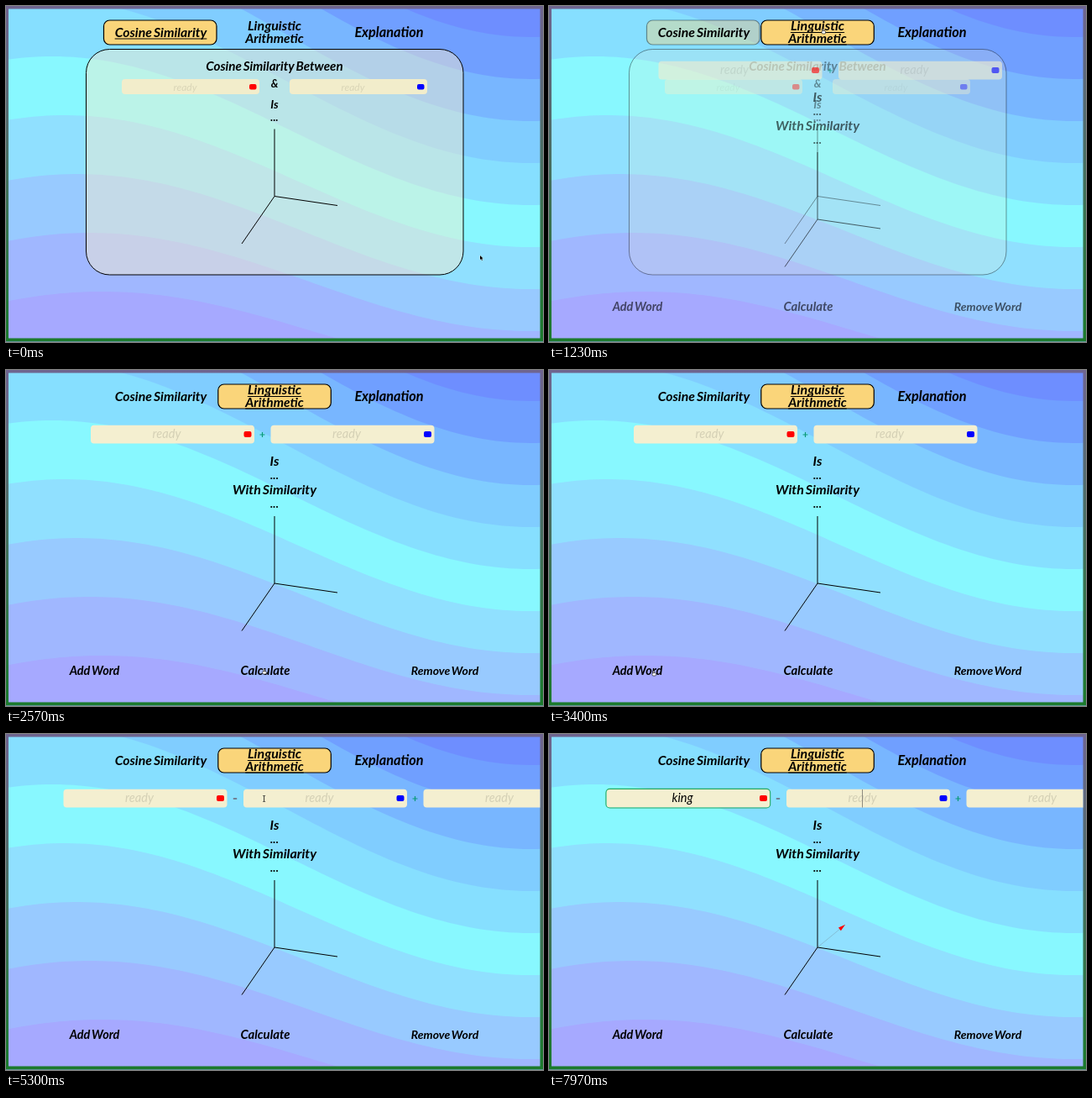
An HTML page with a canvas for the animation above (8 s loop, 640 by 400 pixels).

```html
<!DOCTYPE html>
<html lang="en">
<head>
<meta charset="utf-8">
<title>Word vectors</title>
<style>
  html, body { margin: 0; width: 100%; height: 100%; overflow: hidden; }
  canvas { display: block; width: 640px; height: 400px; }
</style>
</head>
<body>
<canvas id="stage" width="640" height="400"></canvas>
<script>
const ctx = document.getElementById('stage').getContext('2d');
const LOOP = 8000;
const SCRIPT = 'Lato, "Open Sans", sans-serif';
const CREAM = '#f4efd0';
const BANDS = ['#6e8eff', '#709fff', '#78b6ff', '#80cdff', '#86dfff',
               '#88f8ff', '#90e0ff', '#98caff', '#a0b7ff', '#a6a9ff'];

// Keyframes: [time, value, ...]
const CURSOR = [
  [470, 565, 297], [830, 327, 27], [1400, 327, 27], [1850, 267, 72], [2000, 267, 72],
  [2600, 308, 358], [3030, 308, 358], [3330, 125, 358], [3480, 125, 358], [3850, 305, 76],
  [4080, 305, 76], [4230, 351, 77], [4370, 351, 77], [4480, 363, 76], [5230, 363, 76],
  [5400, 215, 76], [5440, 215, 76], [5600, 306, 193]
];
const ROW = [[2050, 130.5], [2450, 101], [4370, 101], [4490, 26.5], [4750, 26.5], [5130, 68.5]];

const progress = (t, from, to) => Math.min(1, Math.max(0, (t - from) / (to - from)));
const smooth = p => p * p * (3 - 2 * p);

function valueAt(keys, t) {
  const next = keys.findIndex(k => k[0] > t);
  if (next === 0) return keys[0].slice(1);
  if (next < 0) return keys[keys.length - 1].slice(1);
  const a = keys[next - 1], b = keys[next];
  const p = smooth(progress(t, a[0], b[0]));
  return a.slice(1).map((v, i) => v + (b[i + 1] - v) * p);
}

function box(x, y, w, h, radius, fill, stroke, lineWidth = 1) {
  ctx.beginPath();
  ctx.roundRect(x, y, w, h, radius);
  if (fill) { ctx.fillStyle = fill; ctx.fill(); }
  if (stroke) { ctx.strokeStyle = stroke; ctx.lineWidth = lineWidth; ctx.stroke(); }
}

function polygon(points, fill, stroke) {
  ctx.beginPath();
  points.forEach(([x, y]) => ctx.lineTo(x, y));
  ctx.closePath();
  if (stroke) { ctx.strokeStyle = stroke; ctx.lineWidth = 1; ctx.stroke(); }
  ctx.fillStyle = fill;
  ctx.fill();
}

function line(x1, y1, x2, y2, color = '#000', lineWidth = 1) {
  ctx.beginPath();
  ctx.moveTo(x1, y1);
  ctx.lineTo(x2, y2);
  ctx.strokeStyle = color;
  ctx.lineWidth = lineWidth;
  ctx.stroke();
}

function label(text, x, y, size, { color = '#000', weight = 700, underline = false } = {}) {
  ctx.font = `italic ${weight} ${size}px ${SCRIPT}`;
  ctx.wordSpacing = '-1.5px';
  ctx.textAlign = 'center';
  ctx.fillStyle = color;
  ctx.fillText(text, x, y);
  if (underline) {
    const half = ctx.measureText(text).width / 2;
    line(x - half, y + 2.5, x + half, y + 2.5);
  }
}

function background() {
  ctx.fillStyle = BANDS[0];
  ctx.fillRect(0, 0, 640, 400);
  BANDS.slice(1).forEach((color, i) => {
    const k = i - 4;
    const crest = 60 + 70 * k, trough = 237 + 50 * k, crestX = 55 + 15 * k;
    const mid = (crest + trough) / 2, amp = (trough - crest) / 2;
    const points = [[640, 400], [0, 400]];
    for (let x = 0; x <= 640; x += 8)
      points.push([x, mid - amp * Math.cos(Math.PI * (x - crestX) / (625 - crestX))]);
    polygon(points, color);
  });
}

function frame() {
  const edge = ctx.createLinearGradient(0, 0, 0, 400);
  edge.addColorStop(0, '#6f6590');
  edge.addColorStop(1, '#1b7a2c');
  ctx.strokeStyle = edge;
  ctx.lineWidth = 4;
  ctx.strokeRect(1, 1.5, 637.5, 396);
}

function axes(y) {
  line(320, y, 320, y - 80);
  line(320, y, 395, y + 11);
  line(320, y, 281, y + 56.5);
}

function tabs(firstAlpha, secondActive) {
  if (firstAlpha > 0) {
    ctx.globalAlpha = firstAlpha;
    box(116.5, 17, 134.5, 29, 7, '#fad57a', '#000', 1.2);
    ctx.globalAlpha = 1;
  }
  if (secondActive) box(252.8, 17, 134.5, 29, 7, '#fad57a', '#000', 1.2);
  label('Cosine Similarity', 184.5, 36.5, 15.8, { underline: firstAlpha > 0.5 });
  label('Linguistic', 320, 29, 16, { underline: secondActive });
  label('Arithmetic', 320, 43.5, 15.5, { underline: secondActive });
  label('Explanation', 456.5, 36.5, 16.3);
}

function similarityPage() {
  box(95.5, 51.5, 449.5, 268.5, 28, 'rgba(245,236,206,.47)', '#000');
  label('Cosine Similarity Between', 320, 77, 15.2);
  [[138, '#f00'], [338, '#00f']].forEach(([x, color]) => {
    box(x, 87, 164, 18, 4, '#f2edcb');
    label('ready', x + 75.5, 101, 12, { color: 'rgba(0,0,0,.1)', weight: 400 });
    box(x + 152, 93, 8.5, 6.5, 2, color);
  });
  label('&', 320, 97, 13);
  label('Is', 320, 122, 14);
  label('...', 320, 136.5, 13);
  axes(226.5);
}

function field(x, color, text) {
  box(x, 65.8, 195, 21.7, 4, CREAM);
  label(text || 'ready', x + 90.5, 81, 14.6,
    { color: text ? '#000' : 'rgba(0,0,0,.13)', weight: 400 });
  if (color) box(x + 182.5, 73, 9, 7, 2, color);
}

function operator(x, plus) {
  const color = plus ? '#0a9a78' : '#5c2630';
  line(x - (plus ? 3 : 2.2), 77, x + (plus ? 3 : 2.2), 77, color, 1.2);
  if (plus) line(x, 74, x, 80, color, 1.2);
}

function vector(length) {
  const tipX = 33 * length, tipY = -27 * length;
  const dx = 0.775, dy = -0.634;
  ctx.save();
  ctx.translate(320, 254);
  line(0, 0, tipX, tipY, 'rgba(110,130,140,.45)', 0.8);
  const head = 8.5 * Math.min(1, length * 2);
  const baseX = tipX - head * dx, baseY = tipY - head * dy;
  polygon([[tipX, tipY], [baseX - 2.3 * dy, baseY + 2.3 * dx],
           [baseX + 2.3 * dy, baseY - 2.3 * dx]], '#f00');
  ctx.restore();
}

function tooltip(x, y) {
  box(x, y, 60.5, 9, 0.5, '#4a5155');
  ctx.font = '5px Inter, Arial, sans-serif';
  ctx.wordSpacing = '0px';
  ctx.textAlign = 'center';
  ctx.fillStyle = '#fff';
  ctx.fillText('Please fill out this field.', x + 30.2, y + 6.3);
}

function arithmeticPage(t, left) {
  const typed = 'king'.slice(0, [7300, 7390, 7470, 7550].filter(s => t >= s).length);
  const submitted = t >= 7670;

  ctx.save();
  ctx.beginPath();
  ctx.rect(3, 60, 633.5, 40);
  ctx.clip();
  field(left, '#f00', typed);
  if (submitted) box(left - 0.6, 65.4, 195.8, 22.6, 4.5, null, '#27a860', 1.1);
  operator(left + 204.5, t < 4050);
  field(left + 214.5, '#00f');
  if (t >= 3450) {
    operator(left + 419, true);
    field(left + 429);
  }
  const blink = Math.floor((t - 5530) / 292) % 2 === 0;
  if (submitted) line(left + 305, 66, left + 305, 87.5, '#8d8b80');
  else if (t >= 7270 || (t >= 5530 && blink)) {
    const x = left + 90.5 + (typed ? ctx.measureText(typed).width / 2 : 0);
    line(x, 66, x, 87.5, '#77756c');
  }
  ctx.restore();

  label('Is', 320, 114, 16);
  label('...', 320, 130, 14);
  label('With Similarity', 320, 147.5, 16);
  label('...', 320, 163.5, 14);
  axes(254);
  if (t >= 7700) vector(smooth(progress(t, 7680, 7960)));
  label('Add Word', 105.5, 363, 14.4);
  label('Calculate', 309, 363, 14.9);
  label('Remove Word', 523, 363, 14);

  if (t >= 1890 && t < 2050) tooltip(267, 83);
  if (t >= 4460 && t < 5230) tooltip(350.3, 86.7);
}

function cursor(t, left) {
  if (t >= 7290) return;
  const [x, y] = valueAt(CURSOR, t);
  const inRow = t > 1150 && y > 65 && y < 88;
  const onOperator = inRow && Math.abs(x - left - 204.5) < 6;
  const onTab = y < 47 && x > 253 && x < 387;
  const onButton = y > 350 && (x < 140 || (x > 279 && x < 340));
  ctx.save();
  ctx.translate(x, y);
  if (onOperator || onTab || onButton) {
    box(-1, 0, 1.8, 4, 0.8, '#fff', '#000', 0.6);
    box(-2, 2.6, 4.6, 3.4, 1.2, '#fff', '#000', 0.6);
  } else if (inRow) {
    line(0.5, -2, 0.5, 4, '#222', 0.9);
    line(-1, -2.5, 2, -2.5, '#222', 0.7);
    line(-1, 4.5, 2, 4.5, '#222', 0.7);
  } else {
    polygon([[0, 0], [0, 5], [1.2, 4], [2, 6], [2.9, 5.6], [2.1, 3.7], [3.6, 3.6]],
      '#000', 'rgba(255,255,255,.7)');
  }
  ctx.restore();
}

function draw(t) {
  const [left] = valueAt(ROW, t);
  const turn = progress(t, 1080, 1330);
  background();
  frame();
  tabs(1 - turn, t >= 780);
  ctx.globalAlpha = 1 - turn;
  if (turn < 1) similarityPage();
  ctx.globalAlpha = turn;
  if (turn > 0) arithmeticPage(t, left);
  ctx.globalAlpha = 1;
  cursor(t, left);
}

const start = performance.now();
function tick() {
  draw((performance.now() - start) % LOOP);
  requestAnimationFrame(tick);
}
tick();
</script>
</body>
</html>
```
